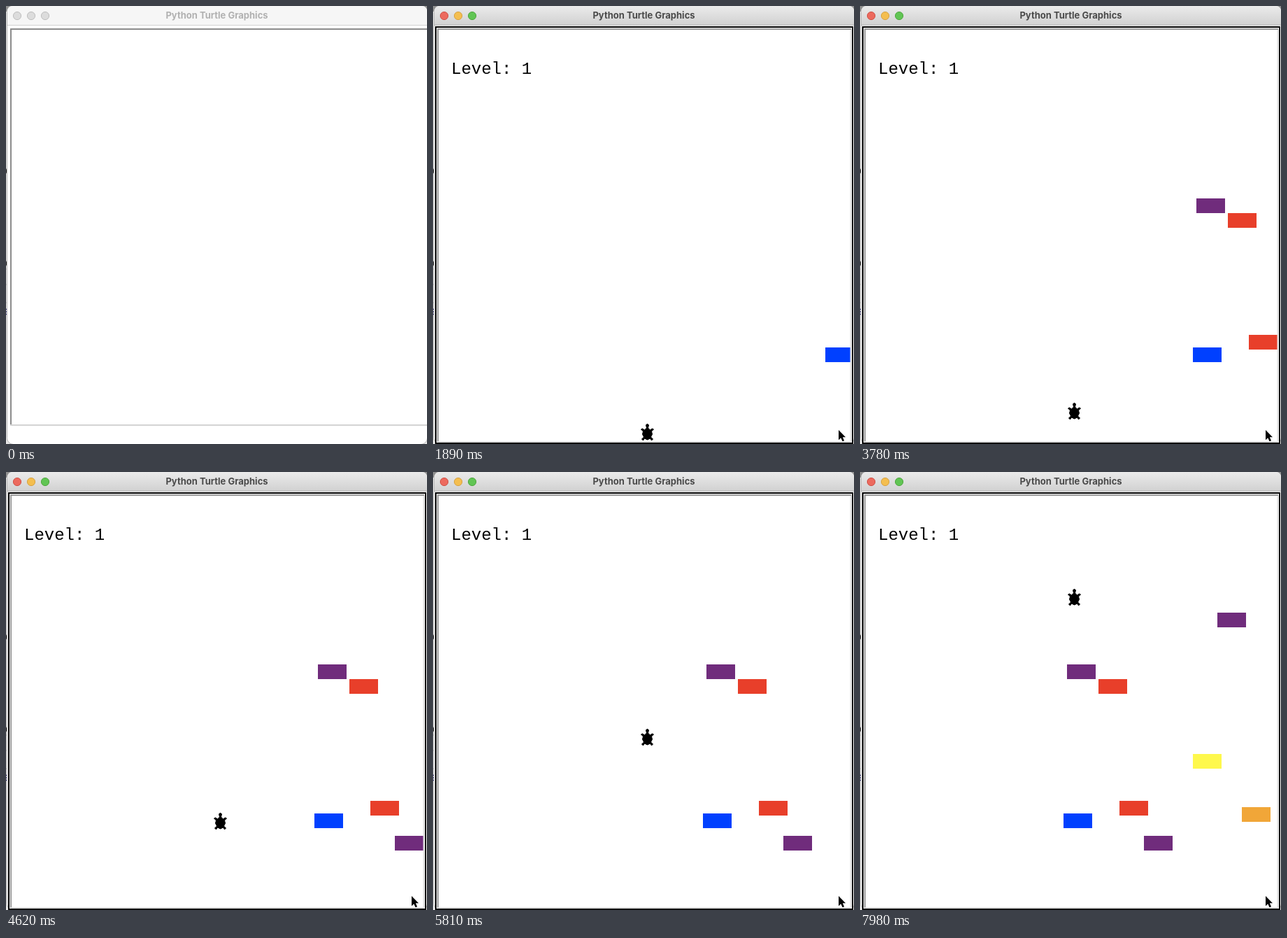
An HTML page that plays this animation: 602x626 px, repeating every 8000 ms.

```html
<!DOCTYPE html>
<html lang="en">
<head>
<meta charset="utf-8">
<title>Python Turtle Graphics</title>
<style>
html, body { margin: 0; width: 100%; height: 100%; overflow: hidden; background: #fff; }
svg { display: block; width: 602px; height: 626px; }
.title { font: 700 13px Inter, sans-serif; text-anchor: middle; }
.level { font: 24px "Liberation Mono", "Courier New", monospace; white-space: pre; }
</style>
</head>
<body>
<svg viewBox="0 0 602 626">
  <defs>
    <linearGradient id="bar" x2="0" y2="1">
      <stop stop-color="#ebebeb"/><stop offset="1" stop-color="#d1d1d1"/>
    </linearGradient>
    <clipPath id="field"><rect x="8" y="34" width="588.5" height="589"/></clipPath>
  </defs>

  <!-- what shows behind the window -->
  <rect width="602" height="626" fill="#e6e6e6"/>
  <path d="M0 0H10V8H0ZM592 0H602V8H592Z" fill="#8e8e8e"/>
  <path d="M0 376H2M0 398H2M0 424H2" stroke="#bbb"/>
  <path d="M2 232Q-1 236 2 240M2 364Q-1 368 2 372" stroke="#222" fill="none" stroke-width="1.5"/>
  <path d="M0 433.5H2M0 437H2M0 440.5H2" stroke="#22226e" stroke-width="1.5"/>

  <rect id="window" x="1.5" y="-.5" width="601" height="627" rx="9" fill="#fff" stroke="#b4b4b4"/>
  <path id="titlebar" d="M2 27V8Q2 0 10 0H594Q602 0 602 8V27Z"/>
  <path id="rule" d="M2 27.5H602"/>
  <g id="lights"></g>
  <text id="title" class="title" x="301.5" y="18">Python Turtle Graphics</text>

  <g id="idle">
    <path d="M602 33H7V599" fill="none" stroke="#8c8c8c" stroke-width="2"/>
    <path d="M6 599H602" stroke="#d4d4d4" stroke-width="2"/>
  </g>

  <g id="game">
    <rect x="4" y="30" width="596" height="595" fill="#fff" stroke="#000" stroke-width="2"/>
    <path d="M598 33H7V623" fill="none" stroke="#999" stroke-width="2"/>
    <path d="M597.5 34V623H7" fill="none" stroke="#dedede" stroke-width="2"/>
    <text class="level" x="26" y="97">Level: 1</text>
    <g id="cars" clip-path="url(#field)"></g>
    <path id="turtle" stroke="#000"/>
  </g>
  <path id="pointer" d="M0 0V14.2L3.2 11.2 5.6 16.2 8 15.2 5.8 10.3H10Z" stroke="#fff" stroke-width="1.2" paint-order="stroke"/>
</svg>
<script>
const LOOP = 8000, SAMPLE = 70;
const TICK = 112.5, TICK0 = 2740;        // game loop
const SPAWN = 561, SPEED = 5;
const PURPLE = '#702c7c', RED = '#e83f2a';

const $ = id => document.getElementById(id);
const set = (el, attrs) => { for (const k in attrs) el.setAttribute(k, attrs[k]); };
const show = (el, on) => set(el, { visibility: on ? 'visible' : 'hidden' });
function add(parent, tag, attrs) {
  const el = document.createElementNS('http://www.w3.org/2000/svg', tag);
  set(el, attrs);
  return parent.appendChild(el);
}

// [first tick, top, colour]
const cars = [
  [-8, 488, '#0040ff'], [-7, 275, PURPLE], [2, 296, RED], [8, 470, RED],
  [15, 520, PURPLE], [29, 403, '#fef84c'], [36, 201, PURPLE], [43, 479, '#f1a638']
].map(([born, y, fill]) => ({
  born, el: add($('cars'), 'rect', { y, fill, width: 41, height: 21 })
}));

const lights = [['#ec6a5e', '#d05147'], ['#f4be4f', '#d6a243'], ['#61c554', '#4fa73f']]
  .map((colours, i) => ({
    colours, el: add($('lights'), 'circle', { cx: 16 + 20 * i, cy: 14, r: 5.6 })
  }));

// right half of the turtle shape, nose to tail; the left half mirrors it
const half = [[0, 16], [2, 14], [1, 10], [4, 7], [7, 9], [9, 8], [6, 5], [7, 1],
  [5, -3], [8, -6], [6, -8], [4, -5], [0, -7]];
const outline = half.concat(half.slice(1, -1).reverse().map(([x, y]) => [-x, y]));
set($('turtle'), { d: 'M' + outline.map(([x, y]) => x + ' ' + -y).join('L') + 'Z' });

const track = [[630, 436, 486], [980, 454, 549], [1610, 580, 606]];
function pointerAt(t) {
  const i = t < track[1][0] ? 0 : 1;
  const [t0, x0, y0] = track[i], [t1, x1, y1] = track[i + 1];
  const k = Math.min(1, Math.max(0, (t - t0) / (t1 - t0)));
  return [x0 + (x1 - x0) * k, y0 + (y1 - y0) * k].map(Math.round);
}

function render(time) {
  const t = Math.floor(time / SAMPLE) * SAMPLE;
  const active = t >= 140, playing = t >= 280;
  const tick = Math.floor((t - TICK0) / TICK);

  set($('titlebar'), { fill: active ? 'url(#bar)' : '#f6f6f6' });
  set($('rule'), { stroke: active ? '#b1b1b1' : '#d2d2d2' });
  set($('title'), { fill: active ? '#4a4a4a' : '#b1b1b1' });
  for (const { el, colours: [fill, stroke] } of lights)
    set(el, active ? { fill, stroke } : { fill: '#dcdcdc', stroke: '#bebebe' });
  show($('idle'), !playing);
  show($('game'), playing);

  for (const { el, born } of cars) {
    set(el, { x: SPAWN - SPEED * (tick - born) });
    set(el, { display: tick >= born ? 'inline' : 'none' });
  }

  // the held key repeats slightly faster than the game loop
  const moves = Math.max(0, Math.floor(3.55 + (tick - 9) * 1.09));
  set($('turtle'), { transform: `translate(306.5 ${613 - 10 * moves})` });

  show($('pointer'), t >= track[0][0]);
  set($('pointer'), { transform: `translate(${pointerAt(t)})` });
}

const start = performance.now();
function frame() {
  render((performance.now() - start) % LOOP);
  requestAnimationFrame(frame);
}
frame();
</script>
</body>
</html>
```
